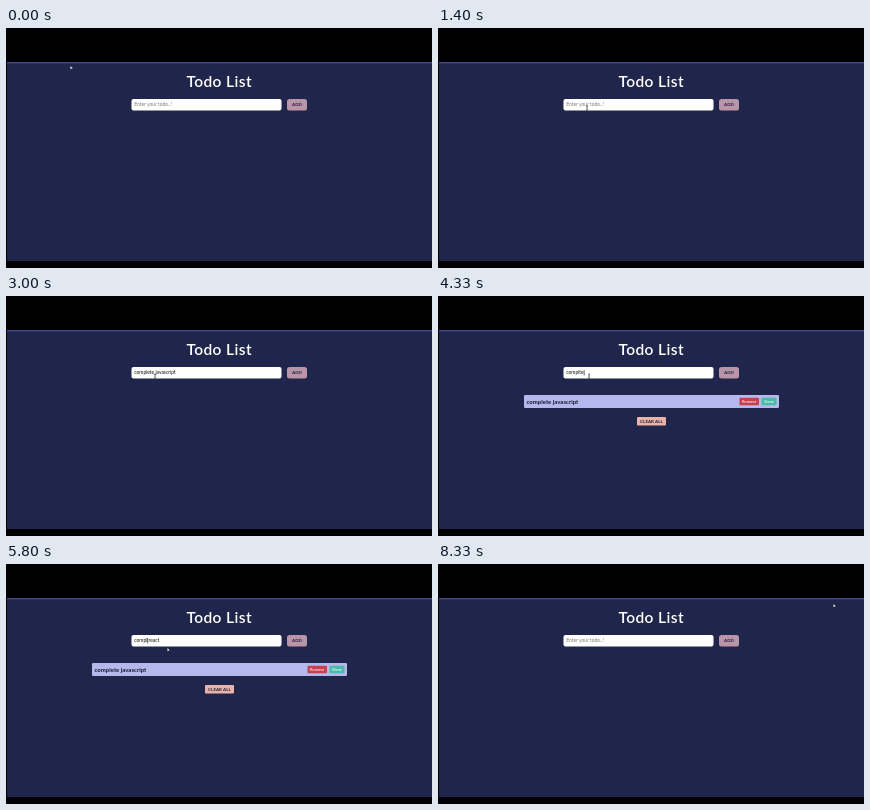
Recreate the animation shown at these times as an HTML page with a canvas. Size 426 by 240 pixels, loop 8390 ms.

```html
<!DOCTYPE html>
<html lang="en">
<head>
<meta charset="utf-8">
<title>Todo List</title>
<style>
html, body { margin: 0; width: 100%; height: 100%; overflow: hidden; background: #000; }
canvas { display: block; width: 426px; height: 240px; }
</style>
</head>
<body>
<canvas id="stage"></canvas>
<script>
const W = 426, H = 240, LOOP = 8390;
const FONT = 'Lato, "Open Sans", sans-serif';
const canvas = document.getElementById('stage');
const ctx = canvas.getContext('2d');
const dpr = window.devicePixelRatio || 1;
canvas.width = W * dpr;
canvas.height = H * dpr;

const JS = 'complete javascript', REACT = 'complete react', TYPO = 'complte react';
const ADD_JS = 3530, ADD_REACT = 6330, DONE = 6930, CLEAR = 7800;

// time, x, y of the pointer
const path = [
  [0, 65, 39], [300, 67, 41], [1000, 149, 80], [3050, 149, 80],
  [3420, 290, 77], [3560, 290, 77], [3900, 151, 80], [4950, 151, 80],
  [5200, 142, 79], [5330, 142, 79], [5550, 162, 85], [6000, 162, 85],
  [6260, 290, 77], [6380, 290, 77], [6800, 331, 105], [6960, 331, 105],
  [7110, 338, 85], [7200, 338, 86], [7650, 213, 150], [7830, 213, 150],
  [8250, 394, 43], [8330, 396, 41], [LOOP, 396, 41]
];

const clamp = v => Math.max(0, Math.min(1, v));
const ease = v => v * v * (3 - 2 * v);
const typed = (text, t, from, to) => text.slice(0, Math.floor(clamp((t - from) / (to - from)) * text.length));

function pointer(t) {
  let i = 1;
  while (i < path.length - 1 && path[i][0] < t) i++;
  const [t0, x0, y0] = path[i - 1], [t1, x1, y1] = path[i];
  const k = ease(clamp((t - t0) / (t1 - t0)));
  return { x: x0 + (x1 - x0) * k, y: y0 + (y1 - y0) * k };
}

// text in the field and the caret's place in it (-1: no focus)
function field(t) {
  if (t < 1500) return { text: '', caret: -1 };
  if (t < ADD_JS) {
    const text = typed(JS, t, 1500, 2900);
    return { text, caret: t < 2950 ? text.length : -1 };
  }
  if (t < 3900) return { text: '', caret: -1 };
  if (t < 5250) {
    const text = typed(TYPO, t, 3900, 4640);
    return { text, caret: text.length };
  }
  if (t < ADD_REACT) {
    const cut = Math.floor(clamp((t - 5350) / 250) * 2);
    const head = 'complte'.slice(0, 7 - cut) + typed('ete', t, 5810, 6050);
    return { text: head + ' react', caret: t < 6260 ? head.length : -1 };
  }
  return { text: '', caret: -1 };
}

function box(x, y, w, h, r, color) {
  ctx.fillStyle = color;
  ctx.beginPath();
  ctx.roundRect(x, y, w, h, r);
  ctx.fill();
}

function label(text, x, y, size, color, weight = 400, align = 'left') {
  ctx.font = `${weight} ${size}px ${FONT}`;
  ctx.textAlign = align;
  ctx.fillStyle = color;
  ctx.fillText(text, x, y);
  return ctx.measureText(text).width;
}

function button(text, x, y, w, h, r, color, ink, size) {
  box(x, y, w, h, r, color);
  label(text, x + w / 2, y + h / 2 + size * 0.36, size, ink, 700, 'center');
}

function item(text, y, done) {
  ctx.globalAlpha = done ? 0.5 : 1;
  box(86, y, 255, 13, 1.2, '#b5b8ec');
  const w = label(text, 88.5, y + 8.8, 6, '#17182e', 700);
  if (done) ctx.fillRect(88.5, y + 6.9, w, 0.5);
  button('Remove', 301.5, y + 2.7, 19.5, 7.6, 1, '#c93f4c', '#f4dfe4', 4);
  button('Done', 323.5, y + 2.7, 15, 7.6, 1, '#48bca6', '#e4f6f4', 4);
  ctx.globalAlpha = 1;
}

function drawField(t) {
  box(125.5, 71, 150, 11.5, 2, '#fff');
  const { text, caret } = field(t);
  if (text) label(text, 128.3, 78.3, 4.9, '#111');
  else label('Enter your todo..!', 128.3, 78.3, 4.9, '#777');
  if (caret >= 0) {
    const x = 128.5 + ctx.measureText(text.slice(0, caret)).width;
    ctx.fillStyle = '#111';
    ctx.fillRect(x, 74, 0.6, 5.5);
  }
}

function drawPointer({ x, y }) {
  if (x > 126 && x < 275 && y > 71 && y < 82.5) {
    ctx.fillStyle = '#222';
    ctx.fillRect(x - 0.3, y - 2, 0.7, 4);
    ctx.fillRect(x - 1, y - 2.2, 2, 0.5);
    ctx.fillRect(x - 1, y + 1.8, 2, 0.5);
    return;
  }
  ctx.beginPath();
  ctx.moveTo(x - 0.5, y - 1);
  ctx.lineTo(x - 0.5, y + 2.4);
  ctx.lineTo(x + 0.4, y + 1.6);
  ctx.lineTo(x + 1.9, y + 1.6);
  ctx.closePath();
  ctx.lineWidth = 0.5;
  ctx.strokeStyle = '#111';
  ctx.stroke();
  ctx.fillStyle = '#fff';
  ctx.fill();
}

function draw(t) {
  ctx.setTransform(dpr, 0, 0, dpr, 0, 0);
  ctx.fillStyle = '#000';
  ctx.fillRect(0, 0, W, H);
  ctx.fillStyle = '#20254b';
  ctx.fillRect(1, 34, 425, 199);
  ctx.fillStyle = '#474a91';
  ctx.fillRect(1, 34, 425, 1.3);

  ctx.letterSpacing = '0.4px';
  label('Todo List', 213.2, 58.8, 15.5, '#fff', 600, 'center');
  ctx.letterSpacing = '0px';
  drawField(t);
  button('ADD', 281, 71, 20, 11.5, 2.5, '#b995aa', '#242037', 4.5);

  if (t >= ADD_JS && t < CLEAR) {
    const two = t >= ADD_REACT;
    if (two) item(REACT, 99, t >= DONE);
    item(JS, two ? 123.5 : 99, false);
    button('CLEAR ALL', 199, two ? 145.3 : 121, 29, 8.5, 1, '#e9b3ab', '#241f30', 4.5);
  }
  drawPointer(pointer(t));
}

const start = performance.now();
function tick() {
  draw((performance.now() - start) % LOOP);
  requestAnimationFrame(tick);
}
tick();
</script>
</body>
</html>
```
